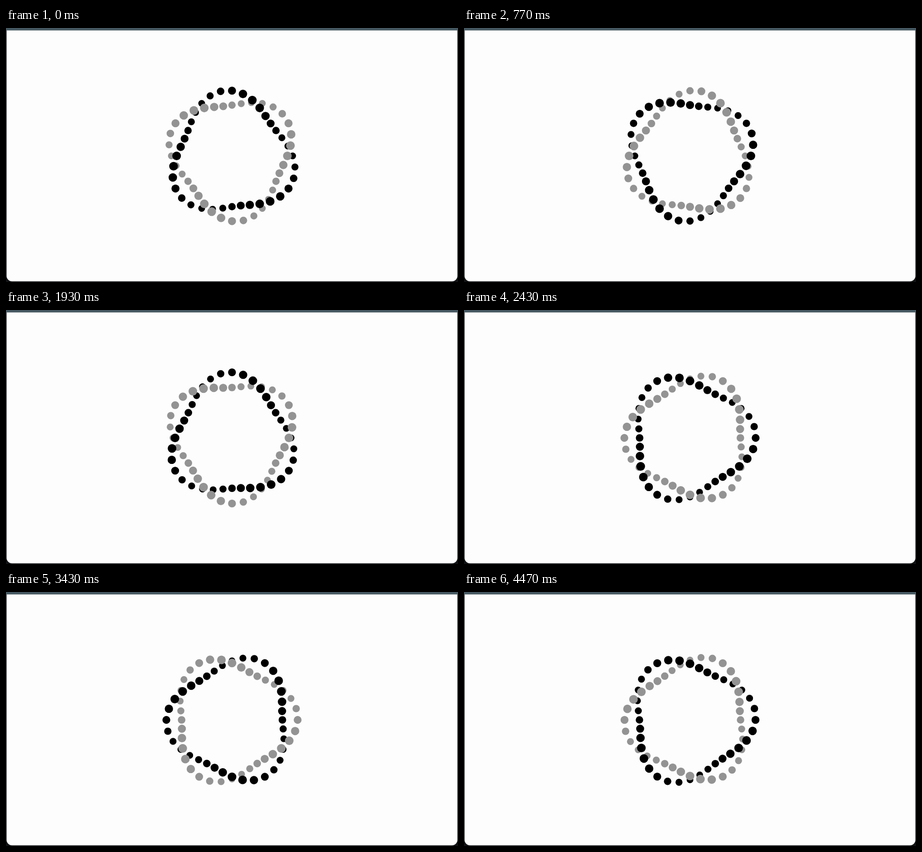
An HTML page with a canvas that plays this animation: 998 by 561 pixels, repeating every 4510 ms.

```html
<!DOCTYPE html>
<html lang="en">
<head>
<meta charset="utf-8">
<title>Twisted ring</title>
<style>
  html, body { margin: 0; width: 100%; height: 100%; overflow: hidden; background: #000; }
  canvas { display: block; }
</style>
</head>
<body>
<canvas id="stage" width="998" height="561"></canvas>
<script>
const ctx = document.getElementById('stage').getContext('2d');
const TAU = Math.PI * 2;
const LOOP = 4510, STEP = 100 / 3, LAST_STEP = 134;
const CENTER = { x: 499, y: 282.5 };
const RING = 128.1, TWIST = 17, TWISTS = 3, BEADS = 36;
const START = 20, TURN = 6; // degrees, degrees per step
const STRANDS = [
  { color: '#000', offset: 0 },
  { color: '#939393', offset: Math.PI }
];

function drawPanel() {
  ctx.fillStyle = '#101214';
  ctx.fillRect(0, 0, 998, 561);
  ctx.fillStyle = '#fdfdfd';
  ctx.beginPath();
  ctx.roundRect(1.3, 4, 995.4, 555.6, [0, 0, 12, 12]);
  ctx.fill();
  ctx.fillStyle = '#465962';
  ctx.fillRect(0, 0, 998, 5.4);
}

function beadAt(index, strand, phase) {
  const angle = index / BEADS * TAU;
  const twist = TWISTS * angle + phase + strand.offset;
  const distance = RING + TWIST * Math.cos(twist);
  const depth = Math.sin(twist);
  return {
    x: CENTER.x + distance * Math.sin(angle),
    y: CENTER.y - distance * Math.cos(angle),
    radius: 8.5 + 1.1 * depth,
    depth,
    color: strand.color
  };
}

function draw(time) {
  const step = Math.min(LAST_STEP, Math.floor((time % LOOP + 3.4) / STEP));
  const phase = (START + TURN * step) * Math.PI / 180;
  const beads = STRANDS.flatMap(strand =>
    Array.from({ length: BEADS }, (_, i) => beadAt(i, strand, phase)));
  beads.sort((a, b) => a.depth - b.depth);

  drawPanel();
  for (const bead of beads) {
    ctx.fillStyle = bead.color;
    ctx.beginPath();
    ctx.arc(bead.x, bead.y, bead.radius, 0, TAU);
    ctx.fill();
  }
}

const begin = performance.now();
function tick() {
  draw(performance.now() - begin);
  requestAnimationFrame(tick);
}
tick();
</script>
</body>
</html>
```
